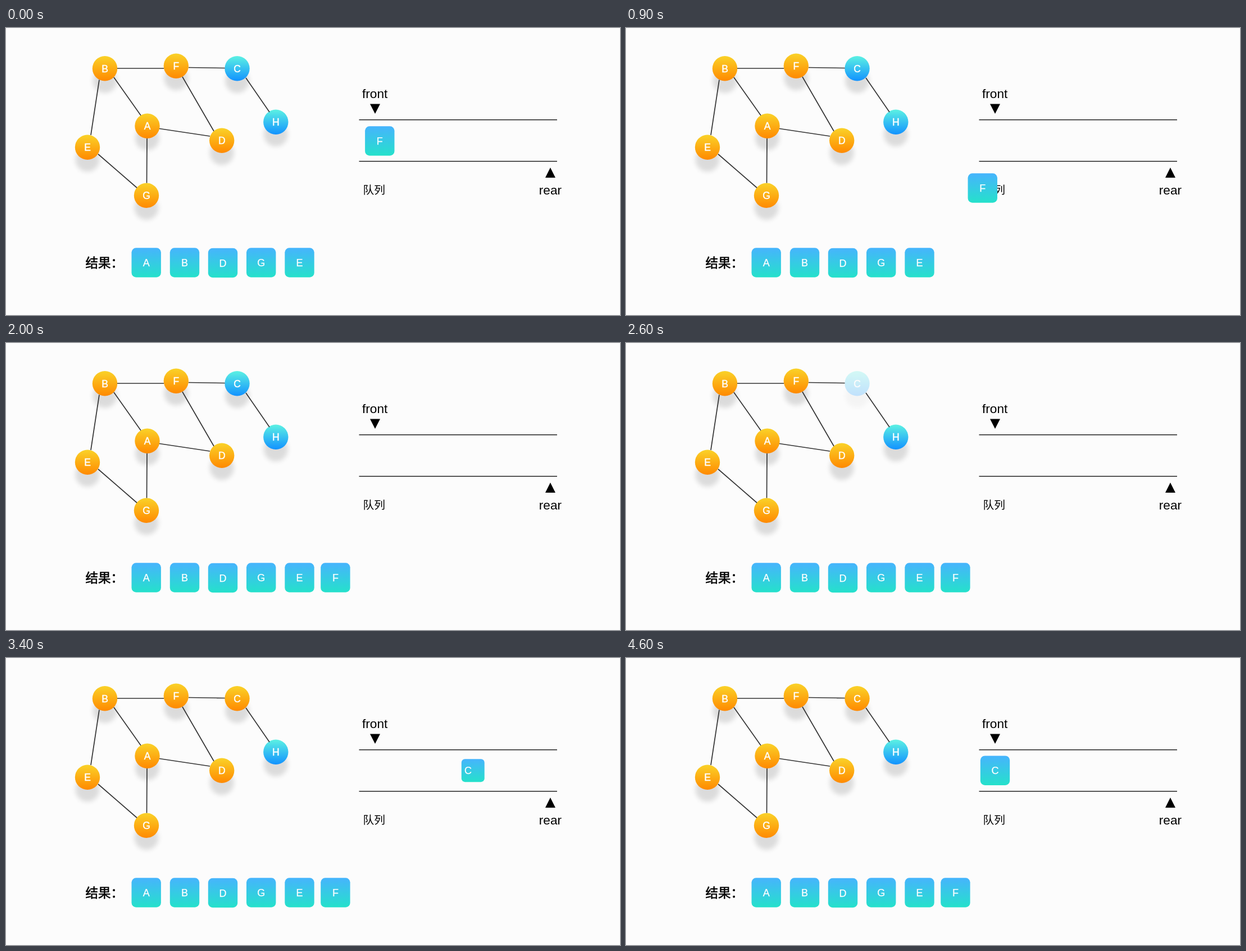
Write an HTML page that moves like this. It is 1093x512 px and loops after 5200 ms.

```html
<!DOCTYPE html>
<html lang="zh">
<head>
<meta charset="utf-8">
<style>
  html, body { margin: 0; width: 100%; height: 100%; overflow: hidden; background: #fcfcfc; }
  svg { display: block; width: 100vw; height: 100vh; }
  text { font-family: "Liberation Sans", Arial, sans-serif; }
  .letter { fill: #fff; font-size: 18px; text-anchor: middle; stroke: #fff; stroke-width: .25px; }
  .node .letter { font-size: 17.5px; stroke-width: .45px; }
  .label { font-size: 22.7px; text-anchor: middle; }
  .cjk { font-family: "Noto Sans CJK SC", "Noto Sans CJK", sans-serif; }
  .strong { stroke: #000; stroke-width: .6px; }
  .edges { stroke: #353535; stroke-width: 1.7; }
  .rails { stroke: #222; stroke-width: 1.5; }
</style>
</head>
<body>
<svg id="stage" viewBox="0 0 1093 512">
  <defs>
    <linearGradient id="orange" x2="0" y2="1">
      <stop stop-color="#fad228"/><stop offset="1" stop-color="#ff8900"/>
    </linearGradient>
    <linearGradient id="blue" x2="0" y2="1">
      <stop stop-color="#5cf1e3"/><stop offset="1" stop-color="#1292ff"/>
    </linearGradient>
    <linearGradient id="aqua" x2="0" y2="1">
      <stop stop-color="#46b4fd"/><stop offset="1" stop-color="#25e1cb"/>
    </linearGradient>
    <filter id="soft" x="-60%" y="-60%" width="220%" height="220%">
      <feGaussianBlur stdDeviation="4.5"/>
    </filter>
  </defs>
  <g id="nodes"></g>
  <path class="edges" d="M198 72H281M325 70.5L389.500 71.500M427 89L469 150M166 92.500L151 191M192 88L240 156
    M273 179.500L363 193M314 87L370 184M251 197L250.500 276.500M164 225L233 285"/>
  <path class="rails" d="M628.500 163.700H981M628.500 237.700H981"/>
  <path d="M648 135.500H666L657 153ZM960 267H978L969 249Z"/>
  <text class="label" x="656.700" y="125">front</text>
  <text class="label" x="969" y="296.500">rear</text>
  <text class="cjk" x="635.500" y="296" font-size="19.700">队列</text>
  <text class="cjk strong" x="141.500" y="427" font-size="22.500" font-weight="500">结果：</text>
  <g id="tiles"></g>
</svg>
<script>
const LOOP = 5200, STEP = 100;
const NS = 'http://www.w3.org/2000/svg';
const byId = id => document.getElementById(id);

function add(parent, tag, attrs, text = '') {
  const el = document.createElementNS(NS, tag);
  for (const key in attrs) el.setAttribute(key, attrs[key]);
  el.textContent = text;
  return parent.appendChild(el);
}

function addNode(name, x, y, color) {
  const g = add(byId('nodes'), 'g', { class: 'node', transform: `translate(${x} ${y})` });
  add(g, 'circle', { cy: 22, r: 21.5, fill: '#000', opacity: .125, filter: 'url(#soft)' });
  add(g, 'circle', { r: 22.2, fill: `url(#${color})` });
  add(g, 'text', { class: 'letter', y: 6.5 }, name);
  return g;
}

function addTile(name, x, y) {
  const g = add(byId('tiles'), 'g', { transform: `translate(${x} ${y})` });
  const box = add(g, 'rect', { x: -26.2, y: -26.2, width: 52.4, height: 52.4, rx: 8, fill: 'url(#aqua)' });
  const letter = add(g, 'text', { class: 'letter', y: 6.5 }, name);
  return { g, box, letter };
}

addNode('B', 176, 72.3, 'orange');
addNode('F', 302.8, 67.7, 'orange');
addNode('A', 251.5, 174.7, 'orange');
addNode('E', 145, 212.8, 'orange');
addNode('D', 384.2, 200.8, 'orange');
addNode('G', 250, 298.7, 'orange');
addNode('H', 480.3, 167.8, 'blue');
const unvisited = addNode('C', 411.5, 72.3, 'blue');
const visited = addNode('C', 411.5, 72.3, 'orange');

addTile('A', 249.7, 418.5);
addTile('B', 318, 418.5);
addTile('D', 386, 419);
addTile('G', 454.2, 418.5);
addTile('E', 522.5, 418.5);
const leaving = addTile('F', 0, 0);
const entering = addTile('C', 0, 0);
entering.g.setAttribute('transform', 'translate(0 200.7)');

const span = (t, from, to) => Math.min(1, Math.max(0, (t - from) / (to - from)));
const mix = (a, b, p) => a + (b - a) * p;
const easeOut = u => 1 - (1 - u) ** 3;

// Constant speed with a gentle start and stop, each lasting a quarter of the move.
function cruise(u, ramp = .25) {
  if (u > .5) return 1 - cruise(1 - u, ramp);
  return u < ramp ? u * u / (2 * ramp * (1 - ramp)) : (u - ramp / 2) / (1 - ramp);
}

function draw(t) {
  const exit = cruise(span(t, 405, 1597));
  leaving.g.setAttribute('transform',
    `translate(${mix(665.3, 586.4, exit)} ${mix(201.5, 418.5, exit)})`);

  unvisited.setAttribute('opacity', 1 - span(t, 2300, 2700));
  visited.setAttribute('opacity', span(t, 2900, 3200));

  const glide = span(t, 3300, 4080);
  const x = mix(920, 657, easeOut(glide));
  entering.g.setAttribute('opacity', span(t, 2950, 3200));
  entering.box.setAttribute('transform', `translate(${x} 0) scale(${mix(.75, 1, glide)})`);
  entering.letter.setAttribute('x', mix(920, 657, easeOut(span(t, 3300, 4000))));
}

function tick() {
  const t = performance.now() % LOOP;
  draw(Math.floor(t / STEP) * STEP);
  requestAnimationFrame(tick);
}
tick();
</script>
</body>
</html>
```
